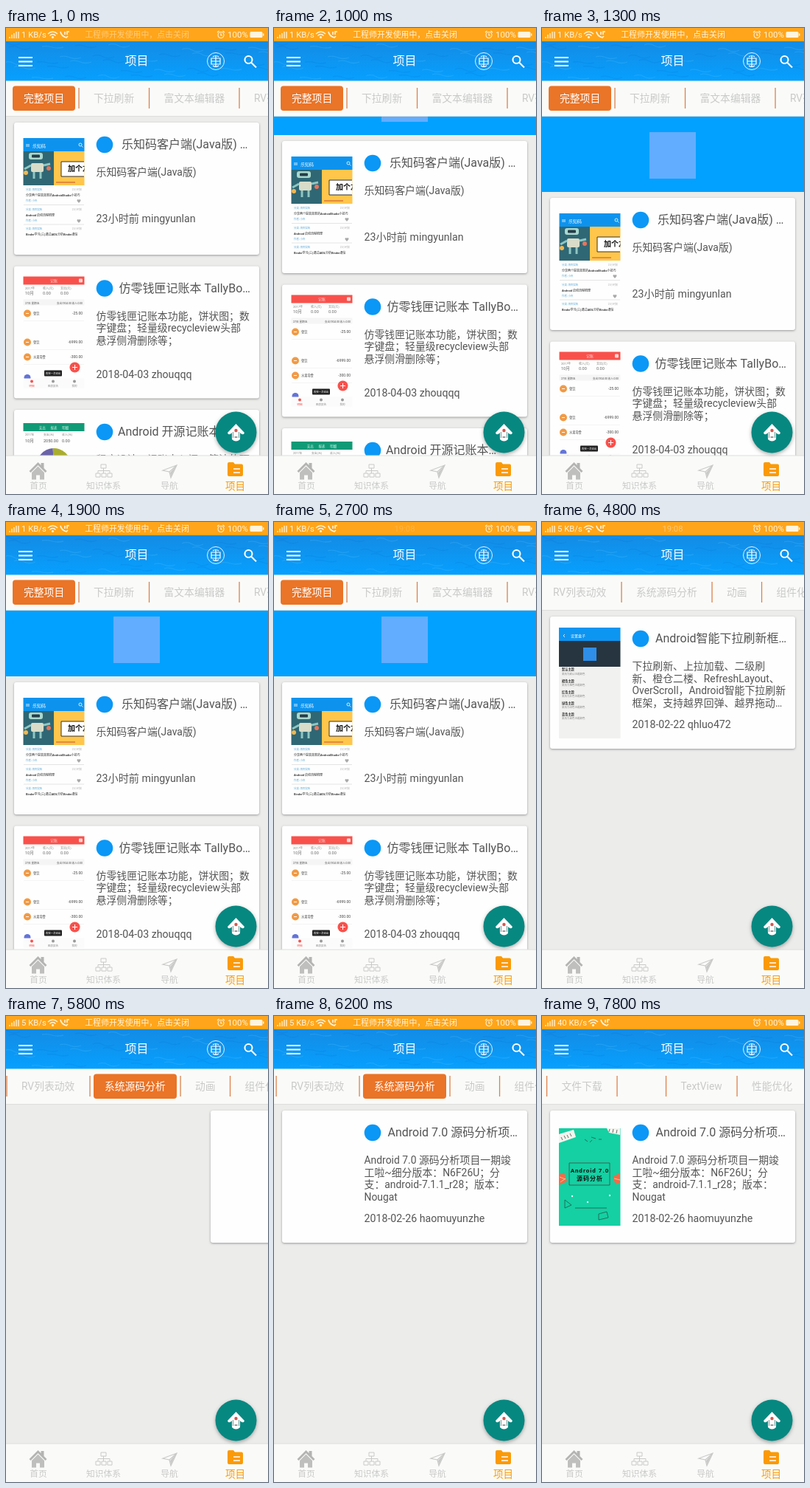
Animation, 356 px wide and 631 px high, one loop 8000 ms. Source, as an HTML page with a canvas:

```html
<!DOCTYPE html>
<html lang="zh">
<head>
<meta charset="utf-8">
<style>
html, body { margin: 0; height: 100%; overflow: hidden; background: #ececeb; }
canvas { display: block; width: 100vw; height: 100vh; }
</style>
</head>
<body>
<canvas></canvas>
<script>
const W = 356, H = 631, LOOP = 8000, STEP = 100;
const canvas = document.querySelector('canvas'), g = canvas.getContext('2d');
const dpr = window.devicePixelRatio || 1;
canvas.width = W * dpr;
canvas.height = H * dpr;

// ---- helpers
function rect(x, y, w, h, color, r = 0) {
  g.fillStyle = color;
  g.beginPath();
  g.roundRect(x, y, w, h, r);
  g.fill();
}
function disc(x, y, r, color) {
  g.fillStyle = color;
  g.beginPath();
  g.arc(x, y, r, 0, 7);
  g.fill();
}
function fill(d, color) {
  g.fillStyle = color;
  g.fill(new Path2D(d));
}
function line(d, color, w = 1) {
  g.strokeStyle = color;
  g.lineWidth = w;
  g.stroke(new Path2D(d));
}
// y is the optical middle of the line
function text(s, x, y, size, color = '#555', align = 'left', weight = 400) {
  g.font = `${weight} ${size}px Roboto, "Noto Sans CJK SC", "Noto Sans CJK", sans-serif`;
  g.textAlign = align;
  g.fillStyle = color;
  g.fillText(s, x, y + size * 0.34);
}
function shadow(blur, dy, color, draw) {
  g.save();
  g.shadowBlur = blur * dpr;
  g.shadowOffsetY = dy * dpr;
  g.shadowColor = color;
  draw();
  g.restore();
}
function clip(x, y, w, h, draw) {
  g.save();
  g.beginPath();
  g.rect(x, y, w, h);
  g.clip();
  draw();
  g.restore();
}
// eased value at time t from [time, value] keys
function at(t, keys) {
  const i = keys.findIndex(k => k[0] > t);
  if (i < 0) return keys[keys.length - 1][1];
  if (i === 0) return keys[0][1];
  const [t0, a] = keys[i - 1], [t1, b] = keys[i], p = (t - t0) / (t1 - t0);
  return a + (b - a) * p * (2 - p);
}

// ---- motion
const PULL = [[900, 0], [1000, 25], [1300, 102], [1400, 102], [1700, 89], [2700, 89], [3000, 0]];
const PAGE = [[3800, 0], [3900, 340], [4100, 356], [5600, 356], [6000, 1424]];
const STRIP = [[4100, 0], [4800, 322], [5600, 322], [6000, 314], [6800, 314], [7700, 819.5]];
const PILL_X = [[3800, 9], [3900, 95], [4100, 104], [5600, 104], [5800, 435]];
const PILL_W = [[5600, 85], [5800, 113]];
const NOTICE = [[0, 0.5], [200, 1], [2300, 1], [2600, 0], [4900, 0], [5300, 1], [7500, 1], [7800, 0]];
const CLOCK = [[2600, 0], [2700, 0.2], [3000, 1], [4600, 1], [4800, 0.45], [5000, 0]];

// ---- thumbnails, y measured from the card top
function newsThumb() {
  rect(23.5, 21, 83, 18, '#0d93ee');
  line('M27 30h5M27 32h5', '#fff', 0.8);
  text('乐知码', 36, 31.5, 6, '#fff');
  line('M99 30a2 2 0 1 0 4 0a2 2 0 1 0-4 0m3.5 1.5l2 2', '#fff', 0.8);
  rect(23.5, 39, 42, 46, '#2f6774');
  rect(65, 39, 41.5, 46, '#ffc64b');
  rect(31, 41, 19, 9, '#a9d8cf', 3);
  rect(35, 43.5, 11, 4, '#263c48', 1);
  rect(34, 55, 17, 12, '#d9dcc8', 2);
  line('M34 58l-9 5M51 58l9-2M38 67v9M47 67v9', '#8fc6c2', 3);
  disc(27, 68, 3, '#f0b752');
  disc(58, 62, 3, '#e8745c');
  rect(75, 53, 31.5, 20, '#fff');
  line('M106 53H75v20h31', '#333', 1);
  clip(75, 53, 31.5, 20, () => text('加个友', 84, 63, 10, '#111', 'left', 700));
  rect(68, 80, 26, 2, '#e48a3b');
  ['分享两个提高效率的AndroidStudio小技巧', 'Android 启动流程梳理', 'Binder学习(三)通过AIDL分析Binder通信'].forEach((s, i) => {
    const y = 91 + i * 26.5;
    text('分类: 项目实践', 27, y, 3.4, '#58a6d8');
    text('23小时前', 103, y, 3.2, '#aaa', 'right');
    text(s, 27, y + 8, 4, '#222', 'left', 500);
    if (i < 2) {
      text('作者: 小舟', 27, y + 15, 3.4, '#58a6d8');
      text('♥', 99, y + 15, 6, '#aaa', 'center');
      line(`M24 ${y + 20.5}h82`, '#ddd', 0.8);
    }
  });
}
function ledgerThumb() {
  rect(23.5, 14, 83, 11, '#f8514c');
  text('记账', 65, 19.5, 5, '#ffd3d0', 'center');
  rect(99, 17, 5, 5, '#ffd3d0', 1);
  ['2017年', '收入(元)', '支出(元)'].forEach((s, i) => text(s, 26 + i * 24, 30, 4, '#888'));
  ['10月', '0.00', '0.00'].forEach((s, i) => text(s, 26 + i * 24, 37, 5.5, '#666'));
  rect(23.5, 45, 83, 8, '#f5f5f5');
  text('27日 星期五', 26, 50, 3.6, '#555');
  text('支出:7824.00 收入:0.00', 104, 50, 3.4, '#555', 'right');
  [['餐饮', '-25.00', 64], ['餐饮', '-6999.00', 103], ['水果零食', '-300.00', 123]].forEach(([s, n, y]) => {
    disc(29, y, 5, '#f19a45');
    line(`M27 ${y}h4`, '#fff', 1);
    text(s, 37, y, 4.2, '#555');
    text(n, 104, y, 5, '#444', 'right');
    line(`M24 ${y + 10}h82`, '#eee', 0.6);
  });
  disc(29, 151, 4.5, '#6373d8');
  rect(52, 141, 24, 8, '#222', 1);
  text('再按一次退出', 64, 145, 3.4, '#fff', 'center');
  disc(93.5, 137, 7, '#f8514c');
  line('M90 137h7M93.5 133.5v7', '#fff', 1);
  rect(23.5, 152, 83, 13, '#fbfbfb');
  ['明细', '图表报告', '我的'].forEach((s, i) => {
    disc(35 + i * 29, 156, 2, i ? '#999' : '#f8514c');
    text(s, 35 + i * 29, 162, 3.5, i ? '#888' : '#f8514c', 'center');
  });
}
function pieThumb() {
  rect(23.5, 18, 83, 11, '#119a76');
  text('支出      报表      明细', 65, 24, 4.5, '#d5f2e8', 'center');
  ['2017年', '支出(元)', '收入(元)'].forEach((s, i) => text(s, 26 + i * 25, 34, 3.8, '#888'));
  ['10月', '2050.00', '0.00'].forEach((s, i) => text(s, 26 + i * 25, 42, 5.5, '#555'));
  ['#6a63a8', '#a9ad2e', '#8fc35a', '#e77b5c'].forEach((c, i) => {
    g.fillStyle = c;
    g.beginPath();
    g.moveTo(65, 75);
    g.arc(65, 75, 23, -3.2 + i * 1.57, -1.63 + i * 1.57);
    g.fill();
  });
}
function themeThumb() {
  rect(23, 15, 83.5, 150, '#f1f1ef');
  rect(23, 15, 83.5, 18, '#0d95f2');
  line('M31 24l-2 2l2 2', '#fff', 0.8);
  text('设置盒子', 39, 26, 5, '#fff');
  rect(23, 33, 83.5, 35, '#273540');
  rect(56, 42, 18, 18, '#2f8ee8');
  ['默认主题', '橙色主题', '红色主题', '绿色主题', '蓝色主题'].forEach((s, i) => {
    text(s, 27, 72 + i * 15.2, 4.2, '#333', 'left', 700);
    text('更改为' + s + '颜色', 27, 77.5 + i * 15.2, 3.5, '#888');
  });
}
function bookThumb() {
  rect(23, 24, 83.5, 132, '#14d0a2');
  fill('M23 32l20-6 3 10-23 8zM88 24h18v9l-15-3z', '#f4f4ee');
  line('M26 36l2 4M30 34l2 4M34 33l2 4M38 31l2 4M92 25l-1 4M97 25l-1 5M102 26l-1 5', '#333', 0.7);
  fill('M23 87l7-3 4 12-11 5zM106 84l-10 6 4 10 6-2z', '#f26b48');
  line('M24 90l8 3M25 97l7-5M98 92l8 2', '#ffd0a0', 0.8);
  line('M37 71h55v30H37z', '#41554f', 0.9);
  g.letterSpacing = '1px';
  text('Android 7.0', 65, 81, 8, '#111', 'center', 700);
  text('源码分析', 65, 92.5, 8, '#111', 'center', 700);
  g.letterSpacing = '0px';
  line('M31 121l9 7-9 4zM77 140l11-3 2 8-13 3zM45 132h43M58 39l4 3M67 36l6 2M65 43l3-3M77 39h4', '#24594d', 0.8);
  [[41, 116], [92, 115], [62, 124]].forEach(([x, y]) => disc(x, y, 1.2, '#e8fff8'));
}

// ---- pages
const card = (title, titleX, lines, meta, metaY, thumb) => ({ title, titleX, lines, meta, metaY, thumb });
const ledgers = [
  card('乐知码客户端(Java版) …', 157, ['乐知码客户端(Java版)'], '23小时前 mingyunlan', 130, newsThumb),
  card('仿零钱匣记账本 TallyBo…', 153.5, ['仿零钱匣记账本功能，饼状图；数', '字键盘；轻量级recycleview头部', '悬浮侧滑删除等；'], '2018-04-03 zhouqqq', 147, ledgerThumb),
  card('Android 开源记账本…', 152, ['程序设计：记账本入门，简洁的项'], '2018-03-20 zhouqqq', 147, pieThumb)
];
const refresh = [card('Android智能下拉刷新框…', 154, ['下拉刷新、上拉加载、二级刷', '新、橙仓二楼、RefreshLayout、', 'OverScroll，Android智能下拉刷新', '框架，支持越界回弹、越界拖动…'], '2018-02-22 qhluo472', 146, themeThumb)];
const source = [card('Android 7.0 源码分析项…', 154.5, ['Android 7.0 源码分析项目一期竣', '工啦~细分版本：N6F26U；分', '支：android-7.1.1_r28；版本：', 'Nougat'], '2018-02-26 haomuyunzhe', 146, bookThumb)];
const pages = { 0: ledgers, 1: refresh, 4: source };

function drawCard(c, x, y, loaded) {
  g.save();
  g.translate(x, y);
  shadow(3, 1, 'rgba(0,0,0,.35)', () => rect(11, 0, 333, 179, '#fdfefd', 3));
  if (loaded) c.thumb();
  disc(134, 30, 11.3, '#0a97f6');
  text(c.title, c.titleX, 30, 16);
  c.lines.forEach((s, i) => text(s, 122.5, 67.5 + i * 16.5, 13.9));
  text(c.meta, 122.5, c.metaY, 14.2);
  g.restore();
}
function drawPages(t) {
  const pull = at(t, PULL), scroll = at(t, PAGE);
  rect(0, 120, W, 460, '#ececeb');
  if (pull > 0) {
    rect(0, 120, W, pull, '#02a1ff');
    rect(146, 39 + pull, 63, 63, '#62adff');
  }
  for (const n in pages) {
    const x = n * W - scroll;
    if (Math.abs(x) >= W) continue;
    pages[n].forEach((c, i) => drawCard(c, x, 128 + pull + i * 194.5, c.thumb !== bookThumb || t >= 6400));
  }
}

// ---- bars
const tabs = [['完整项目', 4], ['下拉刷新', 99], ['富文本编辑器', 194.5], ['RV列表动效', 317], ['系统源码分析', 430],
  ['动画', 553], ['组件化项目', 620.5], ['网络请求', 730.5], ['文件下载', 826], ['', 921.5], ['TextView', 988], ['性能优化', 1084.5]];

function drawTabs(t) {
  const chosen = t < 3900 ? 0 : t < 5800 ? 1 : 4;
  rect(0, 71, W, 49, '#fafbf9');
  rect(0, 119, W, 1, '#dededb');
  g.save();
  g.translate(-at(t, STRIP), 0);
  tabs.slice(1).forEach(([, x]) => rect(x - 0.6, 81, 1.3, 28, '#df8048'));
  rect(at(t, PILL_X), 78.5, at(t, PILL_W), 33.5, '#ea7427', 4);
  tabs.forEach(([s, x], i) => text(s, x + 20, 95.5, 13.8, i === chosen ? '#fff' : '#c9cac8'));
  g.restore();
}
function drawHeader() {
  const sky = g.createLinearGradient(0, 18, 0, 71);
  sky.addColorStop(0, '#148be4');
  sky.addColorStop(1, '#06a0ff');
  rect(0, 18, W, 53.5, sky);
  // faint water ripples
  for (let i = 0; i < 34; i++) {
    const x = i * 83 % 370 - 10, y = 20 + i * 19 % 48;
    line(`M${x} ${y}q7 ${i % 3 - 3} 14 1t15 0`, i % 2 ? 'rgba(105,205,255,.2)' : 'rgba(0,80,190,.1)', 1.3);
  }
  line('M17 40h19M17 45.5h19M17 51h19', '#fff', 2);
  text('项目', 177.5, 45, 16, '#fff', 'center');
  line('M273.5 45a11.5 11.5 0 1 0 23 0a11.5 11.5 0 1 0-23 0', '#fff', 0.9);
  line('M279 41h12v8h-12zM285 37v16M279 45h12M281 39q4-3 8 0M281 51q4 3 8 0', '#fff', 1.2);
  line('M324.5 43a5 5 0 1 0 10 0a5 5 0 1 0-10 0M333 46.5l7 7', '#fff', 2.1);
}
function drawStatus(t) {
  rect(0, 0, W, 18, '#ffa51b');
  const pale = '#fff4dc';
  line('M5 14v-2M8 14v-5M11 14V7M14 14V5M17 14V5', pale, 1.3);
  text(`${t < 2800 ? 1 : t < 6600 ? 5 : 40} KB/s`, 21, 9.5, 11.3, pale);
  g.save();
  g.translate(t < 6600 ? 0 : 6, 0);
  line('M57 8q6.5-6 13 0M59.5 10.5q4-4 8 0', pale, 1.5);
  disc(63.5, 12.5, 1.6, pale);
  line('M74 5q1 6 8 8l2-2M80 9V5M83 9V5h3', pale, 1.6);
  g.restore();
  g.globalAlpha = at(t, NOTICE);
  text('工程师开发使用中，点击关闭', 178, 9.5, 10.9, pale, 'center');
  g.globalAlpha = at(t, CLOCK);
  text('19:08', 177.5, 9.5, 11.3, pale, 'center');
  g.globalAlpha = 1;
  line('M288 9.5a4 4 0 1 0 8 0a4 4 0 1 0-8 0M292 7v3h2M287 6l2.5-2M297 6l-2.5-2', pale, 1.1);
  text('100%', 301, 9.5, 11.5, pale);
  rect(331.5, 5, 17, 8, pale, 1.5);
  rect(349, 7.5, 1.5, 3, pale);
}
function drawButton() {
  shadow(5, 2, 'rgba(0,0,0,.32)', () => disc(312.5, 547.5, 28, '#068881'));
  fill('M312.5 536l11.5 12q-1 4-5 1l-1-1v9q-5.500 5-11 0v-9l-1 1q-4 3-5-1z', '#fff');
  line('M308.500 547v8M316.500 547v8', '#5f8f8b', 0.9);
  disc(312.5, 545, 2.2, '#d4574e');
  line('M310.5 554h4', '#555', 1.2);
}
function drawNav() {
  rect(0, 579, W, 52, '#fafbf9');
  rect(0, 578.5, W, 1, '#dedfdd');
  const gray = '#c9cac8', gold = '#fb9a06';
  fill('M31.5 600L43.5 588l4 4v-3h4v7l4 4-2 2-10-10-10 10z', '#b4b5b3');
  fill('M35 602l8.5-8.5 8.5 8.5v9.5h-6v-6h-5v6h-6z', '#bfc0be');
  line('M129 591h7v5h-7zM122 603h6v5h-6zM130 603h6v5h-6zM138 603h6v5h-6zM132.5 596v7M125 603v-3.5h16v3.5', gray, 1);
  line('M232 592L213 599l9 2 2 8z M232 592l-10 9', gray, 1.2);
  fill('M223 602l8-9-7 15z', gray);
  fill('M303 588h6l2 2.5h9q2 0 2 2v12.500q0 2-2 2h-17q-2 0-2-2v-15q0-2 2-2z', gold);
  line('M309 597h9M309 602h9', '#fff', 1.5);
  ['首页', '知识体系', '导航', '项目'].forEach((s, i) =>
    text(s, [44, 132.5, 222, 311.5][i], 620, i < 3 ? 11.8 : 13.6, i < 3 ? gray : gold, 'center'));
}

function frame(now) {
  const t = Math.floor(now % LOOP / STEP) * STEP;
  g.setTransform(dpr, 0, 0, dpr, 0, 0);
  clip(0, 120, W, 459, () => drawPages(t));
  drawTabs(t);
  drawHeader();
  drawStatus(t);
  drawNav();
  drawButton();
}
const start = performance.now();
(function tick() {
  frame(performance.now() - start);
  requestAnimationFrame(tick);
})();
</script>
</body>
</html>
```
